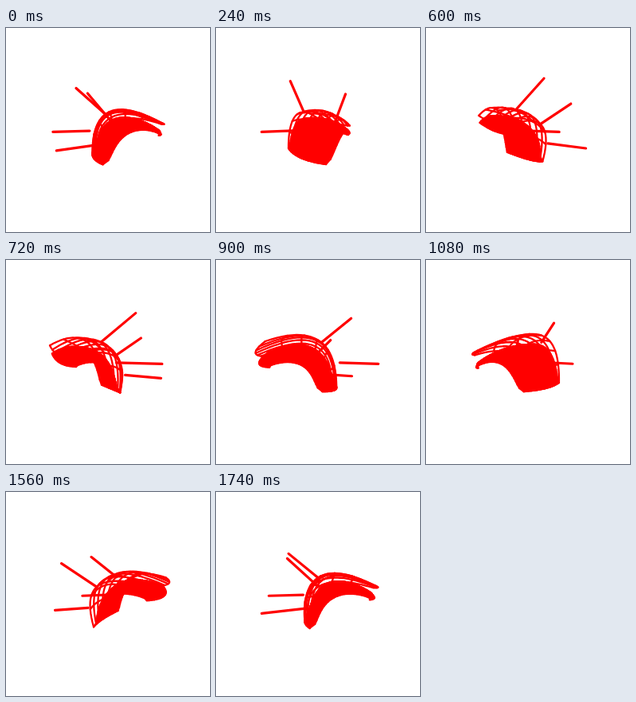
An HTML page with a canvas that plays this animation: 256 px wide and 256 px high, repeating every 1.8 s.

```html
<!DOCTYPE html>
<html lang="en">
<head>
<meta charset="utf-8">
<title>Turning surface</title>
<style>
  html, body { margin: 0; width: 100%; height: 100%; overflow: hidden; background: #fff; }
  canvas { display: block; width: 256px; height: 256px; }
</style>
</head>
<body>
<canvas id="stage" width="256" height="256"></canvas>
<script>
const ctx = document.getElementById('stage').getContext('2d');
const LOOP = 1800, STEP = 60;
const CX = 128, HORIZON = 130, EYE = 224;
const RED = '#ff0000';

// Points are [p, q, y]: two ground axes and height, y pointing down.
// Three ribs, each passing through foot, crest and rim.
const ribs = [
  [[-6, 18, 38], [5, 22, -10], [66, 5, -9]],
  [[-20, -9, 32], [2, -6, -25], [72, -18, -12]],
  [[-18, -36, 22], [0, -40, -24], [52, -48, -22]]
];

// Normals as [base, tip].
const sticks = [
  [[-5, -20, -25], [-40.8, -4.3, -55.6]],
  [[-25, -19, -1], [-72.3, -10.2, 0.3]],
  [[-12, 22, 15], [-51.3, 46.2, 19]],
  [[5, 22, -10], [-19.5, 53.6, -36.5]]
];

// Quadratic through a, b, c at t = 0, 0.5, 1.
function through(a, b, c, t) {
  const wa = (1 - t) * (1 - 2 * t), wb = 4 * t * (1 - t), wc = t * (2 * t - 1);
  return a.map((n, i) => n * wa + b[i] * wb + c[i] * wc);
}

function netPoint(u, v) {
  const [a, b, c] = ribs.map(rib => through(...rib, u));
  return through(a, b, c, v);
}

// The solid sheet hangs inside the net, joined to it at the feet.
function sheetPoint(u, v) {
  const [p, q, y] = netPoint(u, v);
  const pull = Math.sqrt(Math.max(0, Math.sin(Math.PI * u))) * (20 - 14 * v) - 4 * u;
  const dip = (14 - 4 * v) * (1 - (1 - u) ** 3);
  return [p + pull, q, y + dip];
}

function sample(surface, cells) {
  const steps = Array.from({ length: cells + 1 }, (_, i) => i / cells);
  return steps.map(v => steps.map(u => surface(u, v)));
}

const sheetGrid = sample(sheetPoint, 20);
const netGrid = sample(netPoint, 24);
const NET_GAP = 4;

function project([p, q, y], angle) {
  const c = Math.cos(angle), s = Math.sin(angle);
  const scale = EYE / (EYE + p * s - q * c);
  return [CX + (p * c + q * s) * scale, HORIZON + y * scale];
}

function trace(points) {
  ctx.beginPath();
  for (const [x, y] of points) ctx.lineTo(x, y);
}

function drawSheet(view) {
  const g = sheetGrid.map(row => row.map(view));
  ctx.lineWidth = 2;
  for (let j = 1; j < g.length; j++) {
    for (let i = 1; i < g.length; i++) {
      trace([g[j - 1][i - 1], g[j - 1][i], g[j][i], g[j][i - 1]]);
      ctx.closePath();
      ctx.fill();
      ctx.stroke();
    }
  }
}

function drawNet(view) {
  const g = netGrid.map(row => row.map(view));
  ctx.lineWidth = 2.3;
  for (let k = 0; k < g.length; k += NET_GAP) {
    trace(g[k]);
    ctx.stroke();
    trace(g.map(row => row[k]));
    ctx.stroke();
  }
}

function draw(angle) {
  const view = point => project(point, angle);
  ctx.fillStyle = '#fff';
  ctx.fillRect(0, 0, 256, 256);
  ctx.fillStyle = ctx.strokeStyle = RED;
  ctx.lineCap = ctx.lineJoin = 'round';
  drawNet(view);
  drawSheet(view);
  ctx.lineWidth = 3.2;
  for (const stick of sticks) {
    trace(stick.map(view));
    ctx.stroke();
  }
}

const start = performance.now();
function tick() {
  const time = (performance.now() - start) % LOOP;
  draw(Math.floor(time / STEP) * STEP / LOOP * 2 * Math.PI);
  requestAnimationFrame(tick);
}
tick();
</script>
</body>
</html>
```
